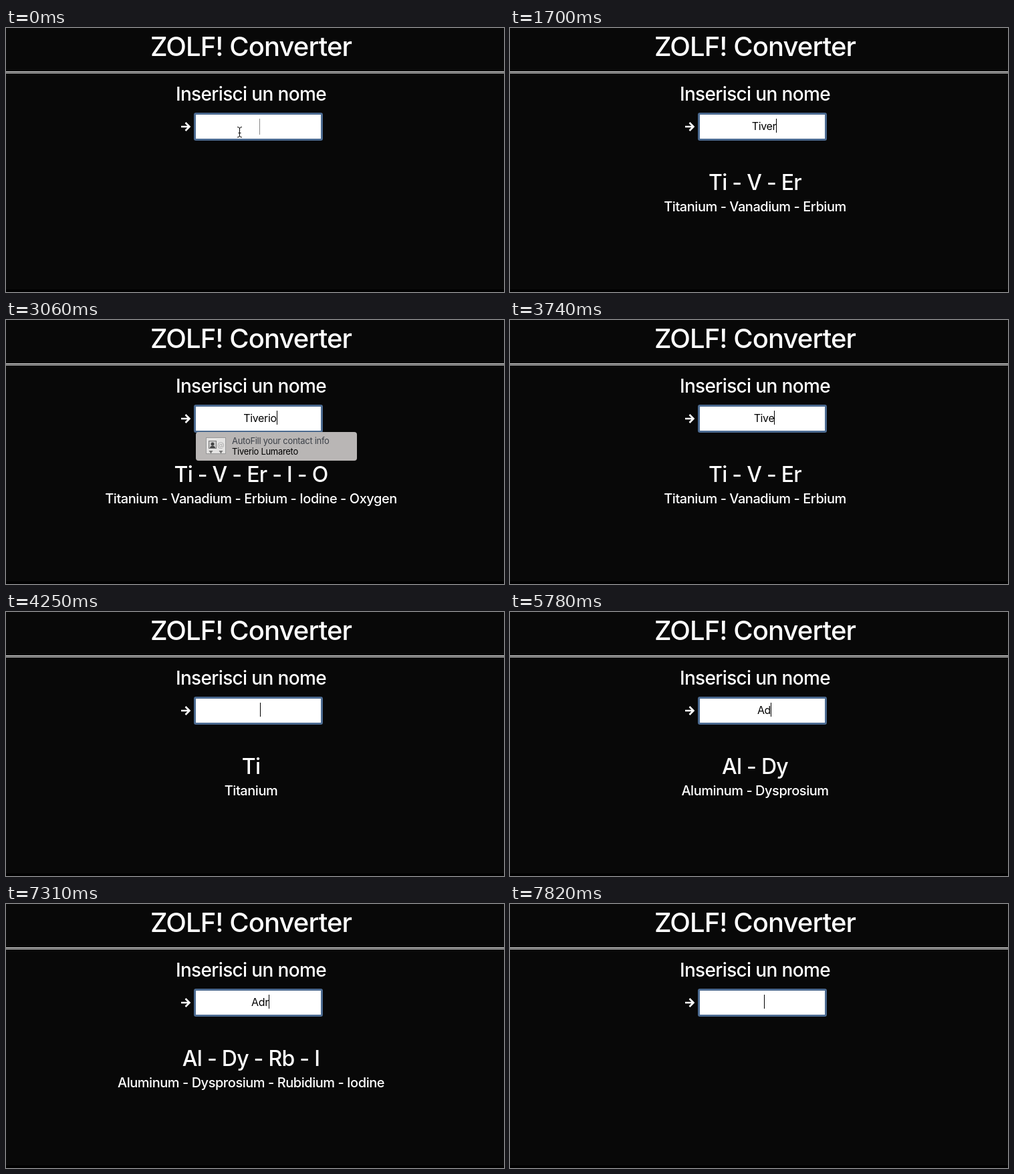
These frames come from a looping animation (745x396 px, 8000 ms). An HTML page:

```html
<!DOCTYPE html>
<html lang="it">
<head>
<meta charset="utf-8">
<title>Generatore di nomi</title>
<style>
  html, body { margin: 0; width: 100%; height: 100%; overflow: hidden; background: #080808; }
  svg { display: block; }
  text { font-family: Inter, sans-serif; letter-spacing: -0.023em; white-space: pre; }
  .heading { fill: #fff; font-weight: 500; text-anchor: middle; }
</style>
</head>
<body>
<svg width="745" height="396" viewBox="0 0 745 396">
  <rect width="745" height="396" fill="#080808"/>
  <rect y="392" width="745" height="4" fill="#000"/>

  <text class="heading" x="366.5" y="42" font-size="40">ZOLF! Converter</text>
  <path d="M0 65.5H745M0 67.5H745" stroke="#fff"/>
  <text class="heading" x="366.5" y="109" font-size="28">Inserisci un nome</text>

  <path d="M262 148H274M268.5 142L274.5 148L268.5 154" fill="none" stroke="#fff" stroke-width="2.6"/>
  <rect x="281" y="127" width="193" height="42" rx="3" fill="#4b6a90"/>
  <rect x="284" y="130" width="187" height="36" fill="#fff"/>
  <text id="typed" x="380" y="153" font-size="16" text-anchor="middle"></text>
  <rect id="caret" y="136" width="1"/>
  <path id="pointer" d="M346 148.5Q349.5 148.5 349.5 151V161.5Q349.5 164 346 164M353 148.5Q349.5 148.5 349.5 151M349.5 161.5Q349.5 164 353 164M347.5 157.5H351.5" fill="none" stroke="#000"/>

  <text id="symbols" class="heading" x="366.5" y="243" font-size="32"></text>
  <text id="elements" class="heading" x="366.5" y="275" font-size="20"></text>

  <g id="popup">
    <rect x="284" y="168" width="241" height="43" rx="4" fill="#b9b6b5"/>
    <rect x="299.5" y="176.5" width="29" height="24" fill="#e4e3e2" stroke="#999"/>
    <rect x="303.5" y="181.5" width="11" height="11" fill="#ccc" stroke="#777"/>
    <path d="M305 192Q305 189 309 188.5Q313 189 313 192Z" fill="#444"/>
    <circle cx="309" cy="186" r="2.5" fill="#444"/>
    <text x="316" y="191" font-size="11" fill="#aaa">@</text>
    <path d="M303.5 196H309.5L306.5 200.5ZM318.5 196H324.5L321.5 200.5Z" fill="#777"/>
    <text x="338" y="186" font-size="13" fill="#3c4048">AutoFill your contact info</text>
    <text x="338" y="202" font-size="13">Tiverio Lumareto</text>
  </g>
</svg>
<script>
const LOOP = 8000;
const NAMES = {
  Ti: 'Titanium', V: 'Vanadium', Er: 'Erbium', I: 'Iodine', O: 'Oxygen',
  Al: 'Aluminum', Dy: 'Dysprosium', Rb: 'Rubidium'
};

// [start in ms, typed text, element symbols]; results trail the typing slightly
const STEPS = [
  [0, '', ''],
  [1020, 'T', 'Ti'],
  [1190, 'Ti', 'Ti'],
  [1360, 'Tiv', 'Ti V'],
  [1530, 'Tive', 'Ti V'],
  [1700, 'Tiver', 'Ti V Er'],
  [1870, 'Tiveri', 'Ti V Er'],
  [2040, 'Tiveri', 'Ti V Er I'],
  [2210, 'Tiverio', 'Ti V Er I O'],
  [3400, 'Tiveri', 'Ti V Er I O'],
  [3570, 'Tiver', 'Ti V Er I'],
  [3740, 'Tive', 'Ti V Er'],
  [3910, 'Ti', 'Ti V'],
  [4080, 'T', 'Ti'],
  [4250, '', 'Ti'],
  [4420, '', ''],
  [5780, 'Ad', 'Al Dy'],
  [6460, 'Adr', 'Al Dy'],
  [6800, 'Adri', 'Al Dy Rb I'],
  [7310, 'Adr', 'Al Dy Rb I'],
  [7480, 'Ad', 'Al Dy'],
  [7650, 'A', 'Al'],
  [7820, '', '']
];
const CARET_OFF = [[510, 1020], [2550, 3060], [4930, 5440]];

const part = id => document.getElementById(id);
const show = (id, visible) => part(id).setAttribute('visibility', visible ? 'visible' : 'hidden');
const within = (t, [start, end]) => t >= start && t < end;

function draw(t) {
  const [, text, symbolList] = STEPS.findLast(([start]) => t >= start);
  const symbols = symbolList.split(' ').filter(Boolean);
  const typed = part('typed');
  const caret = part('caret');

  typed.textContent = text;
  part('symbols').textContent = symbols.join(' - ');
  part('elements').textContent = symbols.map(s => NAMES[s]).join(' - ');

  const idle = t < 1020;
  const width = text ? typed.getComputedTextLength() : 0;
  caret.setAttribute('x', idle ? 379 : Math.round(380 + width / 2));
  caret.setAttribute('height', idle ? 24 : 21);
  caret.setAttribute('fill', idle ? '#888' : '#000');

  show('caret', !CARET_OFF.some(span => within(t, span)));
  show('pointer', idle);
  show('popup', within(t, [2380, 3400]));
}

const origin = performance.now();
function tick() {
  draw((performance.now() - origin) % LOOP);
  requestAnimationFrame(tick);
}
tick();
</script>
</body>
</html>
```
